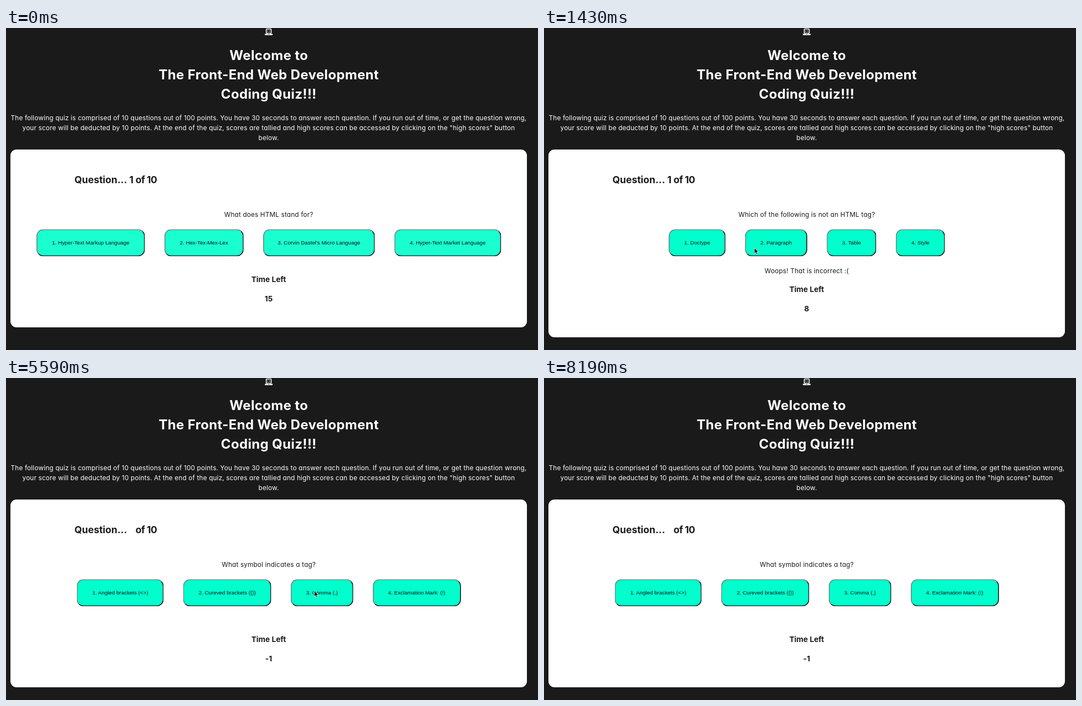
An HTML page that plays this animation: 960x583 px, repeating every 8710 ms.

```html
<!DOCTYPE html>
<html lang="en">
<head>
<meta charset="utf-8">
<title>Coding Quiz</title>
<style>
html, body { margin: 0; width: 100%; height: 100%; overflow: hidden; background: #1a1a1a; }
#stage { position: absolute; left: 0; top: 0; width: 960px; height: 583px; overflow: hidden; }
svg { position: absolute; left: 0; top: 0; }
text {
  font-family: Inter, "Open Sans", sans-serif;
  font-size: 11.74px;
  letter-spacing: .18px;
  font-optical-sizing: none;
  font-variant-ligatures: no-contextual;
  font-feature-settings: "cv11";
  text-anchor: middle;
  fill: #1a1a1a;
}
.light text { fill: #fff; }
.title text { font-size: 24px; font-weight: 700; letter-spacing: .33px; }
.count text { font-size: 17.5px; font-weight: 700; letter-spacing: 0; text-anchor: start; }
#timer text { font-size: 13.7px; font-weight: 700; letter-spacing: 0; }
.row {
  position: absolute; left: 0; top: 0;
  width: 1294px; height: 67px;
  transform: translate(0, 364.3px) scale(.733);
  transform-origin: 0 0;
  display: flex; justify-content: center; gap: 48px;
}
.row div {
  box-sizing: border-box;
  display: flex; align-items: center; justify-content: center;
  padding: 0 36px;
  border: 2px solid;
  border-color: #767676 #000 #000 #767676;
  border-radius: 17px;
  background: var(--fill);
  color: #111;
  font: 13.333px Arial, "Liberation Sans", sans-serif;
  white-space: nowrap;
}
.row .fixed { width: 275px; padding: 0; }
</style>
</head>
<body>
<div id="stage">
  <svg width="960" height="583" viewBox="0 0 960 583">
    <g fill="none" stroke="#fff">
      <rect x="469.6" y="1.8" width="9" height="7.6" rx=".9" stroke-width="1.5"/>
      <path d="M473 4.1L471.7 5.5L473 6.9M475.2 4.1L476.5 5.5L475.2 6.9" stroke-width=".9"/>
      <path d="M467 10.6H472.3Q472.5 11.4 473.2 11.4H475Q475.7 11.4 475.9 10.6H481.2V11.4Q481.2 13.1 479.6 13.1H468.6Q467 13.1 467 11.4Z" fill="#fff" stroke="none"/>
    </g>
    <g class="light title">
      <text x="474.2" y="57.7">Welcome to</text>
      <text x="474.2" y="92.7">The Front-End Web Development</text>
      <text x="474.2" y="127.7">Coding Quiz!!!</text>
    </g>
    <g class="light">
      <text x="474" y="166.6">The following quiz is comprised of 10 questions out of 100 points. You have 30 seconds to answer each question. If you run out of time, or get the question wrong,</text>
      <text x="474" y="184.9">your score will be deducted by 10 points. At the end of the quiz, scores are tallied and high scores can be accessed by clicking on the "high scores" button</text>
      <text x="474" y="203.1">below.</text>
    </g>
    <rect id="card" x="8" y="220" width="932" height="322" rx="11" fill="#fff"/>
    <g class="count">
      <text x="123.5" y="281">Question...</text>
      <text id="number" x="222.6" y="281">1</text>
      <text x="233.7" y="281" style="letter-spacing:-.5px">of 10</text>
    </g>
    <text id="question" x="474" y="342"></text>
    <text id="message" x="474" y="444.2">Woops! That is incorrect :(</text>
    <g id="timer">
      <text x="474" y="459.6">Time Left</text>
      <text id="left" x="474" y="494.7"></text>
    </g>
  </svg>
  <div class="row">
    <div>1. Hyper-Text Markup Language</div>
    <div>2. Hex-Tex-Mex-Lex</div>
    <div class="fixed">3. Corvin Dastel's Micro Language</div>
    <div>4. Hyper-Text Market Language</div>
  </div>
  <div class="row">
    <div>1. Doctype</div>
    <div>2. Paragraph</div>
    <div>3. Table</div>
    <div>4. Style</div>
  </div>
  <div class="row">
    <div>1. Angled brackets (&lt;&gt;)</div>
    <div>2. Cureved brackets ({})</div>
    <div>3. Comma (,)</div>
    <div>4. Exclamation Mark: (!)</div>
  </div>
  <svg width="960" height="583" viewBox="0 0 960 583">
    <path id="cursor" d="M0 0V10.3L2.4 8.1L3.9 11.6L5.8 10.8L4.3 7.4H7.4Z" fill="#000" stroke="#fff" stroke-width=".8"/>
  </svg>
</div>
<script>
const LOOP = 8710, STEP = 130;
const $ = id => document.getElementById(id);
const stage = $("stage"), rows = document.querySelectorAll(".row");

const questions = [
  [0, "What does HTML stand for?"],
  [1430, "Which of the following is not an HTML tag?"],
  [4290, "What symbol indicates a tag?"]
];
const ticks = [[0, 15], [390, 14], [1430, 8], [2470, 7], [3510, 6], [4290, 0], [5330, -1]];
// start, end, from x, y, to x, y
const moves = [
  [0, 910, 520, 502, 379.6, 398.2],
  [1560, 2860, 379.6, 398.2, 556.3, 385.6],
  [5850, 6630, 556.3, 385.6, 815, -10]
];

const indexAt = (list, t) => list.filter(e => e[0] <= t).length - 1;
const show = (el, on) => { el.style.visibility = on ? "visible" : "hidden"; };
const within = (t, a, b) => t >= a && t < b;

function cursorAt(t) {
  const [a, b, x0, y0, x1, y1] = moves[indexAt(moves, t)];
  const p = Math.min(1, (t - a) / (b - a));
  const k = 1 - (1 - p) ** 3;
  return [x0 + (x1 - x0) * k, y0 + (y1 - y0) * k];
}

function render(time) {
  const t = Math.floor((time % LOOP) / STEP) * STEP;
  const q = indexAt(questions, t);
  rows.forEach((row, i) => show(row, i === q));
  $("question").textContent = questions[q][1];
  $("left").textContent = ticks[indexAt(ticks, t)][1];
  show($("number"), q < 2);
  show($("message"), within(t, 1430, 1690) || within(t, 4290, 4550));
  $("card").setAttribute("height", q ? 340 : 322);
  $("timer").setAttribute("transform", `translate(0 ${q ? 18.3 : 0})`);
  stage.style.setProperty("--fill", t < 1040 ? "#1affd0" : "#00ffcc");
  show($("cursor"), within(t, STEP, 6760));
  $("cursor").setAttribute("transform", `translate(${cursorAt(t).join(" ")})`);
}

const start = performance.now();
function frame() {
  render(performance.now() - start);
  requestAnimationFrame(frame);
}
render(0);
requestAnimationFrame(frame);
</script>
</body>
</html>
```
